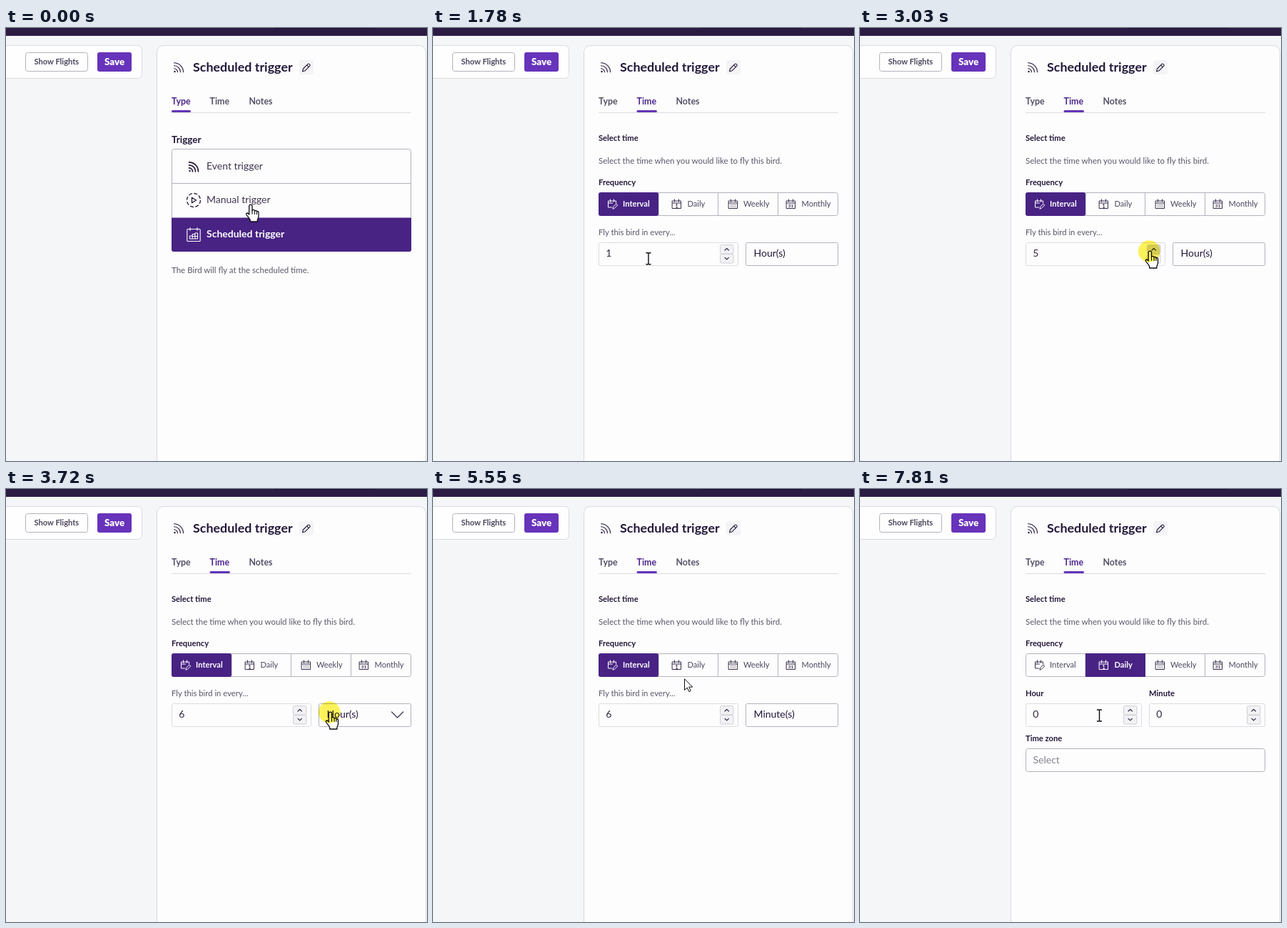
Animation of 590 by 606 pixels, one loop 8000 ms. Source, as an HTML page:

```html
<!DOCTYPE html>
<html lang="en">
<head>
<meta charset="utf-8">
<title>Scheduled trigger</title>
<style>
  html, body { margin: 0; width: 100%; height: 100%; overflow: hidden; background: #f5f6f8; }
  svg { display: block; width: 590px; height: 606px; font-family: Lato, "Open Sans", sans-serif; }
  .line { fill: none; stroke: currentColor; stroke-linecap: round; stroke-linejoin: round; }
  .seg { color: #39304d; }
  .seg rect { fill: none; }
  .seg text { fill: #4d475d; }
  .seg.on { color: #fff; }
  .seg.on rect { fill: #482384; }
  .seg.on text { fill: #fff; font-weight: 700; }
  .tab text { fill: #575168; }
  .tab rect { fill: none; }
  .tab.on text, .tab.over text { fill: #4b268d; }
  .tab.on rect { fill: #6434b8; }
  #spot { mix-blend-mode: multiply; }
</style>
</head>
<body>
<svg id="stage" viewBox="0 0 590 606" xmlns="http://www.w3.org/2000/svg"></svg>
<script>
const LOOP = 8000;
const INK = '#231739', SOFT = '#5b566a', GREY = '#858190', EDGE = '#b4b2bd', PALE = '#dcdce3', DEEP = '#482384';

const text = (x, y, s, size, fill = INK, weight = 400, id = '') =>
  `<text ${id && `id="${id}"`} x="${x}" y="${y}" font-size="${size}" font-weight="${weight}" fill="${fill}">${s}</text>`;
const box = (x, y, w, h, fill, stroke = 'none', r = 3, extra = '') =>
  `<rect x="${x}" y="${y}" width="${w}" height="${h}" rx="${r}" fill="${fill}" stroke="${stroke}" ${extra}/>`;
const line = (d, w = 1, color = 'currentColor') =>
  `<path class="line" d="${d}" stroke-width="${w}" style="stroke:${color}"/>`;
const at = (x, y, body) => `<g transform="translate(${x} ${y})">${body}</g>`;
const group = (id, body, extra = '') => `<g id="${id}" ${extra}>${body}</g>`;
const label = (x, y, s) => text(x, y, s, 11.2, INK, 700);

const rss = (x, y, w) => at(x, y,
  line('M.5 8.8a5 5 0 0 1 5 5M.5 4.8a9 9 0 0 1 9 9M.5 .8a13 13 0 0 1 13 13', w, INK) +
  `<circle cx="1.5" cy="13" r="1.2" fill="${INK}"/>`);

const calendar = 'M.5 2.5h12v10.5h-12zM.5 5.5h12M3.5 .3v3.4M9.5 .3v3.4';
const glyph = (x, y, s, size) =>
  `<text x="${x}" y="${y}" font-size="${size}" font-weight="700" text-anchor="middle" style="fill:currentColor">${s}</text>`;
const segIcons = [
  line('M5.5 11.5h-5v-9h11v3M.5 5.5h6M3.5 .3v3.4M8.5 .3v3.4M7 13.3l.6-2.6 4.2-4.2 1.9 1.9-4.2 4.2z'),
  line(calendar) + glyph(6.5, 12, '1', 7),
  line(calendar) + line('M3.3 8h.1M5.4 8h.1M7.5 8h.1M9.6 8h.1M3.3 10.5h.1M5.4 10.5h.1M7.5 10.5h.1M9.6 10.5h.1', 1.2),
  line(calendar) + glyph(6.5, 11.8, '31', 6.4)
];
const segments = [
  ['Interval', 232, 245, 266], ['Daily', 316, 335, 356.5],
  ['Weekly', 400, 414, 435], ['Monthly', 484, 495, 516.5]
].map(([name, x, ix, tx], i) =>
  group('seg' + i, box(x, 230, 84, 33, 'none', 'none', i ? 0 : 3) +
    at(ix, 239.5, segIcons[i]) + text(tx, 250, name, 11.1), 'class="seg"')).join('');

const tabs = [['Type', 232, 27], ['Time', 285.5, 28.5], ['Notes', 340.5, 32]].map(([name, x, w], i) =>
  group('tab' + i, text(x, 107, name, 12.4, SOFT, 700) +
    box(x, 115, w, 3, 'none', 'none', 1.5), 'class="tab"')).join('');

const spinner = (x, id = '') =>
  box(x + .5, 303.5, 18.5, 12.5, '#f2f1f4', '#d0cfd8', 2, id && `id="${id}"`) +
  box(x + .5, 316.5, 18.5, 12.5, '#f2f1f4', '#d0cfd8', 2) +
  line(`M${x + 7} 311l2.7-2.6 2.7 2.6M${x + 7} 321.3l2.7 2.6 2.7-2.6`, 1.1, INK);
const field = (x, w, value, id = '', spinId = '') =>
  box(x + .5, 300.5, w, 32, '#fdfdfd', PALE, 2) +
  text(x + 10.3, 320, value, 14, '#30263f', 400, id) + spinner(x + w - 25, spinId);

const chrome =
  box(0, 0, 590, 606, '#f5f6f8', 'none', 0) +
  box(0, 0, 590, 11, '#2c1c44', 'none', 0) +
  box(376, 0, 141, 1, '#180e27', 'none', 0) +
  box(-10.5, 24.5, 201, 46, '#fefefe', '#dbdbe1', 6) +
  box(27.5, 34.5, 87, 26, '#fefefe', EDGE) +
  text(39.5, 51, 'Show Flights', 11.1, '#4d475d', 700) +
  box(128, 34, 48, 27, '#6733bb') +
  text(138, 52, 'Save', 13.3, '#fff', 900) +
  box(211.5, 24.5, 377, 620, '#fdfdfd', '#d9dae0', 9) +
  rss(235, 48, 1.1) +
  text(262, 60.5, 'Scheduled trigger', 17.9, INK, 700) +
  box(411, 45, 20, 20, '#f4f4f7') +
  line('M415.5 60.8l1-3.8 6.6-6.6q.9-.8 1.8 0l.9 .9q.8 .9 0 1.8l-6.5 6.6zM421.6 51.9l2.7 2.7', 1.1, INK) +
  box(232, 118, 336, 1, PALE, 'none', 0) + tabs;

const typeView = group('typeView',
  text(232, 161, 'Trigger', 13.5, INK, 700) +
  box(232.5, 169.5, 335, 143, '#fdfdfd', EDGE) +
  line('M233 217.5H567', 1, EDGE) +
  `<path d="M232 265.5h336V310q0 3-3 3h-330q-3 0-3-3z" fill="${DEEP}"/>` +
  rss(256, 187, 1.7) +
  text(281, 198, 'Event trigger', 14, '#40364f') +
  `<circle cx="263" cy="241" r="9.5" fill="none" stroke="${INK}" stroke-width="1.3" stroke-dasharray="5 2.46"/>` +
  line('M260.5 237.3v7.4l6-3.7z', 1.3, INK) +
  text(281, 245, 'Manual trigger', 14, '#40364f') +
  at(253, 279, line('M.8 3.5q0-1 1-1h16.4q1 0 1 1v15q0 1-1 1h-16.4q-1 0-1-1zM5 .5v4M15 .5v4M4.5 16v-4h3.7v4zM8.2 16v-6.5h3.7V16zM11.9 16v-8h3.6v8zM8.2 12.5h7.3', 1.1, '#fff')) +
  text(281, 293, 'Scheduled trigger', 14, '#fff', 700) +
  text(232, 343, 'The Bird will fly at the scheduled time.', 11.5, SOFT));

const intervalView = group('intervalView',
  text(232, 290, 'Fly this bird in every...', 11.3, SOFT) +
  field(232, 195, '1', 'count', 'spinUp') +
  box(438.5, 300.5, 129, 32, '#fdfdfd', EDGE, 2, 'id="unitBox"') +
  text(449.5, 320, 'Hour(s)', 14, INK, 400, 'unit') +
  group('chevron', line('M540.5 312l8 8 8-8', 1.5, '#4d475d')) +
  group('menu',
    box(438.5, 340.5, 129, 95, '#fefefe', PALE, 3, 'style="filter:drop-shadow(0 1px 3px rgba(40,30,60,.18))"') +
    box(439, 350, 128, 33, '#f4f5f8', 'none', 0, 'id="band"') +
    text(449.5, 371, 'Hour(s)', 14) + text(449.5, 408, 'Minute(s)', 14) +
    line('M544.5 368l4.5 4.5 8.5-9', 1.3, INK)));

const dailyView = group('dailyView',
  label(232, 290, 'Hour') + field(232, 162, '0') +
  label(405, 290, 'Minute') + field(405, 162, '0') +
  box(250, 307, 1, 17, INK, 'none', 0, 'id="caret"') +
  label(232, 353, 'Time zone') +
  box(232.5, 363.5, 335, 32, '#fdfdfd', EDGE) +
  text(242.5, 384, 'Select', 14, GREY));

const timeView = group('timeView',
  label(232, 158, 'Select time') +
  text(232, 190, 'Select the time when you would like to fly this bird.', 11.5, SOFT) +
  label(232, 220, 'Frequency') +
  box(232.5, 230.5, 335, 32, '#fdfdfd', EDGE) +
  line('M316 231v31M399.5 231v31M483.5 231v31', 1, EDGE) +
  segments + intervalView + dailyView);

const pointer = group('pointer',
  group('hand',
    '<path d="M-2.3 2.2C-2.3 -.5 2 -.5 2 2.2V8.6C2.6 6.8 5.4 7 5.6 9.2C6.3 7.8 8.3 8.2 8.5 10C9.5 9 11 9.7 11 11.4V16.5C11 19 9.6 20.2 9.4 21.5V24H-.8V22C-1 20-4.8 16.5-6 14.2C-7 12.2-4.6 11.2-3.4 12.8L-2.3 14Z" fill="#fff" stroke="#0c0913" stroke-width="1.3" stroke-linejoin="round"/>' +
    line('M2 8.6v4.6M5.6 9.4v4M8.5 10.2v3.4', 1.1, '#0c0913')) +
  group('arrow', '<path d="M.5 .8V16.5l3.7-3.5 2.6 5.6 2.4-1.1-2.5-5.4h5z" fill="#fff" stroke="#0c0913"/>') +
  group('beam', line('M-2 -7h2q1 0 1 1 0-1 1-1h2M1 -6V8M-2 9h2q1 0 1-1 0 1 1 1h2', 1.4, '#0c0913')));

const stage = document.getElementById('stage');
stage.innerHTML = chrome + typeView + timeView + pointer +
  '<circle id="spot" r="15.3" fill="#fdf45c"/>';

const $ = id => document.getElementById(id);
const show = (id, on) => $(id).setAttribute('display', on ? 'inline' : 'none');

// pointer stops: time, x, y
const stops = [
  [70, 343, 247], [600, 301, 104], [740, 301, 104], [750, 282, 245.5],
  [900, 282, 245.5], [1370, 298, 321], [1740, 298, 321], [2030, 352, 335],
  [2330, 406.5, 312], [3240, 406.5, 312], [3640, 454.5, 312], [4000, 454.5, 312],
  [4140, 458, 306], [4560, 477, 425], [4780, 480.5, 413], [5290, 480.5, 413],
  [5550, 352, 265], [5800, 352, 265], [5810, 353.5, 240], [6360, 353.5, 240],
  [7080, 334.5, 316]
];
// pressed intervals
const presses = [
  [2370, 2490], [2630, 2720], [2800, 2890], [3030, 3100], [3170, 3240],
  [3720, 3790], [4870, 5060], [5810, 5990], [7280, 7340]
];
const bumps = [2490, 2630, 2800, 3030, 3170];

function pointerAt(t) {
  const i = stops.findIndex(s => s[0] > t);
  if (i === 0) return stops[0].slice(1);
  if (i < 0) return stops[stops.length - 1].slice(1);
  const [t0, x0, y0] = stops[i - 1], [t1, x1, y1] = stops[i];
  const p = (t - t0) / (t1 - t0), e = p * p * (3 - 2 * p);
  return [x0 + (x1 - x0) * e, y0 + (y1 - y0) * e];
}

function shapeAt(x, y, s) {
  const inside = (a, b, c, d) => x >= a && x <= c && y >= b && y <= d;
  if (inside(232, 92, 373, 118)) return 'hand';
  if (!s.time) return inside(232, 169, 568, 313) ? 'hand' : 'arrow';
  if (inside(232, 230, 568, 263)) return 'hand';
  if (s.open && inside(438, 340, 568, 436)) return 'hand';
  if (inside(232, 300, s.daily ? 368 : 402, 333)) return 'beam';
  if (!s.daily && (inside(402, 300, 422, 333) || inside(438, 300, 568, 333))) return 'hand';
  return 'arrow';
}

function render(t) {
  const s = { time: t >= 750, daily: t >= 5900, open: t >= 3860 && t < 4990 };
  const [x, y] = pointerAt(t);
  const pressed = presses.some(([a, b]) => t >= a && t < b);
  const shape = shapeAt(x, y, s);

  show('typeView', !s.time);
  show('timeView', s.time);
  show('intervalView', !s.daily);
  show('dailyView', s.daily);
  for (let i = 0; i < 3; i++) $('tab' + i).classList.toggle('on', i === +s.time);
  $('tab1').classList.toggle('over', !s.time && y < 118);
  for (let i = 0; i < 4; i++) $('seg' + i).classList.toggle('on', i === +s.daily);

  $('count').textContent = 1 + bumps.filter(b => t >= b).length;
  $('spinUp').setAttribute('fill', pressed && t < 3300 ? '#d8d7dc' : '#f2f1f4');
  $('unit').textContent = s.open ? 'Start Typing...' : t < 3860 ? 'Hour(s)' : 'Minute(s)';
  $('unit').setAttribute('fill', s.open ? GREY : INK);
  $('unitBox').setAttribute('fill', s.open ? '#f3f3f6' : '#fdfdfd');
  show('chevron', !s.open && x >= 438 && y >= 300 && y <= 333);
  show('menu', s.open);
  $('band').setAttribute('y', y < 385 ? 350 : 387);
  show('caret', t >= 7280 && t < 7810);

  for (const k of ['hand', 'arrow', 'beam']) show(k, k === shape);
  $('pointer').setAttribute('transform', `translate(${x} ${y})`);
  show('spot', pressed);
  $('spot').setAttribute('cx', x - 1.3);
  $('spot').setAttribute('cy', y + .5);
}

const start = performance.now();
function tick() {
  render((performance.now() - start) % LOOP);
  requestAnimationFrame(tick);
}
tick();
</script>
</body>
</html>
```
